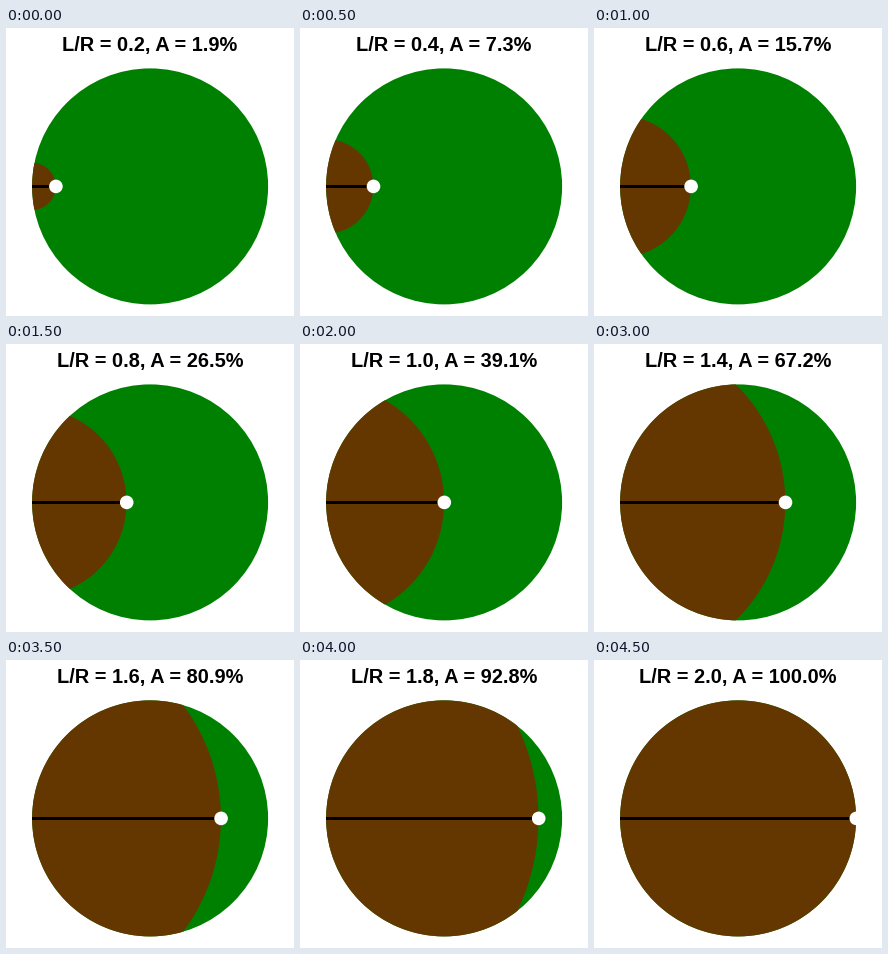
Write a matplotlib script that moves like this. It is 288x288 px and loops after 5000 ms.

```python
import numpy as np
import matplotlib.pyplot as plt
from matplotlib.animation import FuncAnimation
from matplotlib.patches import Circle, Polygon

SIZE, DPI = 288, 100
CX, CY, R = 144.1, 158.4, 118
STEPS, INTERVAL = 10, 500
POST = np.array([CX - R, CY])


def arc(center, radius, start, stop):
    t = np.linspace(start, stop, 200)
    return np.column_stack([center[0] + radius * np.cos(t),
                            center[1] + radius * np.sin(t)])


def lens(k):
    """Outline of the region within k*R of the post, inside the field."""
    a = np.arccos(1 - k * k / 2)
    b = np.arccos(k / 2)
    rim = arc((CX, CY), R, np.pi - a, np.pi + a)
    reach = arc(POST, k * R, -b, b)
    return np.vstack([rim, reach])


def share(k):
    """Lens area as a percentage of the field."""
    area = (k * k * np.arccos(k / 2) + np.arccos(1 - k * k / 2)
            - k / 2 * np.sqrt(4 - k * k))
    return 100 * area / np.pi


fig = plt.figure(figsize=(SIZE / DPI, SIZE / DPI), dpi=DPI, facecolor="white")
ax = fig.add_axes([0, 0, 1, 1])
ax.set(xlim=(0, SIZE), ylim=(SIZE, 0))
ax.axis("off")

ax.add_patch(Circle((CX, CY), R, fc="#008000", lw=0))
grazed = ax.add_patch(Polygon(lens(0.2), fc="#643700", lw=0))
rope, = ax.plot([], [], color="black", lw=3 * 72 / DPI,
                solid_capstyle="projecting", zorder=3)
goat = ax.add_patch(Circle(POST, 6.8, fc="white", lw=0, zorder=4))
title = ax.text(144, 23, "", ha="center", va="baseline", color="black",
                family="Liberation Sans", weight="bold", size=20 * 72 / DPI)


def draw(i):
    k = (i + 1) / 5
    x = POST[0] + k * R
    grazed.set_xy(lens(k))
    rope.set_data([POST[0] + 0.5, x], [CY, CY])
    goat.center = (x + 0.2, CY)
    title.set_text(f"L/R = {k:.1f}, A = {share(k):.1f}%")
    return grazed, rope, goat, title


anim = FuncAnimation(fig, draw, frames=STEPS, interval=INTERVAL,
                     repeat=True, repeat_delay=0)
plt.show()
```
